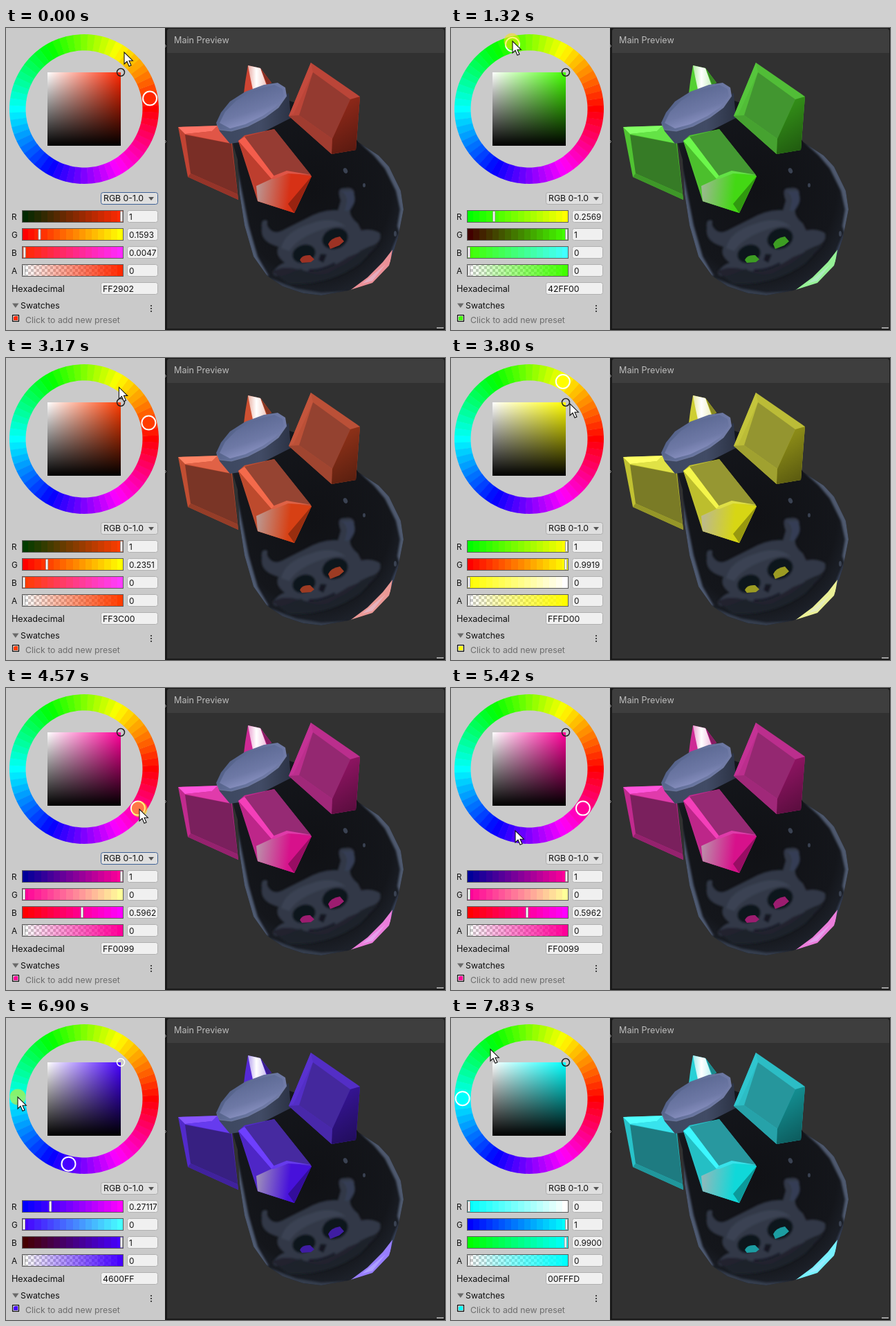
Recreate the animation shown at these times as an HTML page. Size 635x436 px, loop 8000 ms.

```html
<!DOCTYPE html>
<html lang="en">
<head>
<meta charset="utf-8">
<title>Colour picker and material preview</title>
<style>
html, body { margin: 0; width: 100%; height: 100%; overflow: hidden; background: #191919; }
svg { display: block; width: 635px; height: 436px; }
text { font: 12.3px Inter, "Open Sans", sans-serif; fill: #101010; }
.wide { font-size: 12.6px; }
#sliders text { font-size: 11.8px; }
</style>
</head>
<body>
<svg id="stage" viewBox="0 0 635 436">
  <defs>
    <linearGradient id="white"><stop stop-color="#fff"/><stop offset="1" stop-color="#fff" stop-opacity="0"/></linearGradient>
    <linearGradient id="black" x2="0" y2="1"><stop stop-opacity="0"/><stop offset="1"/></linearGradient>
    <linearGradient id="pale" x1="0" y1=".45" x2=".6" y2=".5"><stop stop-color="#b4b0b2" stop-opacity=".8"/><stop offset="1" stop-color="#b4b0b2" stop-opacity="0"/></linearGradient>
    <linearGradient id="shine"><stop stop-color="#fff" stop-opacity=".55"/><stop offset=".45" stop-color="#fff"/><stop offset="1" stop-color="#fff" stop-opacity=".7"/></linearGradient>
    <linearGradient id="dusk" x1=".4" y1="0" x2=".7" y2="1"><stop stop-opacity="0"/><stop offset="1" stop-opacity=".4"/></linearGradient>
    <linearGradient id="lip" x1="0" y1=".3" x2="1" y2=".7"><stop stop-color="#4c5a80"/><stop offset=".5" stop-color="#65729c"/><stop offset="1" stop-color="#7780ac"/></linearGradient>
    <linearGradient id="bowl" x1=".2" y1="0" x2=".7" y2="1"><stop stop-color="#53618a"/><stop offset=".6" stop-color="#6e79a6"/><stop offset="1" stop-color="#9aa0d2"/></linearGradient>
    <linearGradient id="neck"><stop stop-color="#3c475f"/><stop offset=".6" stop-color="#414b65"/><stop offset="1" stop-color="#2c3345"/></linearGradient>
    <radialGradient id="glass" cx=".48" cy=".45" r=".58"><stop stop-color="#101115"/><stop offset=".75" stop-color="#14161b"/><stop offset="1" stop-color="#20252f"/></radialGradient>
    <pattern id="check" width="8" height="8" patternUnits="userSpaceOnUse"><path d="M0 0h8v8H0z" fill="#fff"/><path d="M0 0h4v4H0zM4 4h4v4H4z" fill="#c6c6c6"/></pattern>
    <filter id="soft" x="-20%" y="-20%" width="140%" height="140%"><feGaussianBlur stdDeviation="1.8"/></filter>
    <clipPath id="bodyClip"><path d="M326 160L335 190 338 240 345 285 358 330 378 358 400 373 430 383 456 386 495 379 530 368 554 343 567 302 575 262 571 235 554 200 539 184 510 165 480 130 410 105Z"/></clipPath>
  </defs>

  <!-- preview -->
  <path d="M0 0H635V436H0z" fill="#191919"/>
  <path d="M233 434V5q0-4 4-4H630q4 0 4 4V434z" fill="#313131"/>
  <path d="M233 36V5q0-4 4-4H630q4 0 4 4V36z" fill="#3e3e3e"/>
  <text class="wide" x="243" y="22" style="fill:#bdbdbd">Main Preview</text>
  <path d="M623 433H633" stroke="#a0a0a0" stroke-width="2"/>

  <g id="model">
    <path data-s=".65 1" d="M350 54L368 58 384 79 362 90 344 94 346 78z"/>
    <path d="M350 54L368 58 377 83 357 89 353 70z" fill="url(#shine)"/>
    <path data-s=".42 .7" d="M369 60L384 79 378 83z"/>

    <g clip-path="url(#bodyClip)">
      <path d="M320 100H580V390H320z" fill="url(#glass)"/>
      <g filter="url(#soft)">
        <path d="M333 195L336 240 343 285 356 330 374 358 380 358 364 330 351 285 342 240z" fill="#5d6b88" opacity=".8"/>
        <path d="M510 164L541 183 556 200 573 235 577 262 570 298 566 286 570 262 564 235 548 203 532 184z" fill="#5d6983" opacity=".8"/>
        <path d="M378 360L400 375 430 385 456 388 495 380 456 382 420 376z" fill="#343d4e"/>
        <path d="M558 320L568 296 570 300 556 343z" fill="#39435a"/>
      </g>
      <path data-s=".45 3" d="M496 380L523 360 545 338 559 320 555 343 530 369z"/>
      <path data-s=".3 3.8" d="M515 369L536 352 549 341 530 365z"/>

      <g filter="url(#soft)" fill="#303746">
        <path d="M378 285Q386 301 404 290L432 276Q458 261 480 263L484 249Q477 230 489 231 505 228 504 241 507 252 499 258 494 270 509 282L514 292Q529 289 541 296 545 310 526 316L513 322Q501 337 482 345L466 354Q446 360 426 348L404 357Q386 361 386 352 394 341 403 339 388 328 394 316 367 309 370 289 368 274 378 278z"/>
        <path d="M398 318Q402 294 442 282 473 271 492 287 475 283 446 295 420 306 410 322z" fill="#3a4252"/>
        <path d="M482 236Q492 236 493 250L490 264 498 263Q509 250 501 235z" fill="#38415a" opacity=".7"/>
        <path d="M385 352Q401 342 425 349 455 358 494 331L539 312 512 340Q465 373 408 369z" fill="#1e232d" opacity=".9"/>
        <ellipse cx="431" cy="326" rx="17" ry="13" transform="rotate(-18 431 326)" fill="#11141b"/>
        <ellipse cx="476" cy="304" rx="19" ry="15" transform="rotate(-20 476 304)" fill="#11141b"/>
        <path d="M455 326l9 1-5 12-7-4z" fill="#141821"/>
        <path d="M438 350Q456 351 476 340" fill="none" stroke="#1a1f29" stroke-width="4"/>
      </g>
      <path data-s=".5 .7" d="M425 335Q428 327 440 328L446 334 441 338 428 339z"/>
      <path data-s=".5 .7" d="M466 312Q470 303 483 301L489 308 482 314 469 319z"/>
      <g fill="#3a4252"><ellipse cx="491" cy="206" rx="3" ry="4" transform="rotate(-25 491 206)"/><ellipse cx="518" cy="227" rx="2" ry="3"/><ellipse cx="563" cy="297" rx="2" ry="4"/></g>
    </g>

    <path data-s=".6 1" d="M249 143L315 141 327 167 336 248 263 215z"/>
    <path data-s=".78 2" d="M249 143L306 141 298 149 259 153z"/>
    <path data-s=".66 1.4" d="M259 153L298 149 306 141 315 141 327 167z"/>
    <path data-s=".36 .75" d="M259 154L326 167 335 240 267 210z"/>
    <path data-s=".46 .8" d="M267 210L335 240 336 248 263 215z"/>

    <path d="M304 137L309 149 324 167 345 164 412 130 409 94z" fill="url(#neck)"/>
    <path d="M304 137L311 122 324 106 346 92 373 82 393 79 404 86 406 98 394 115 375 129 350 142 326 149 309 147z" fill="url(#lip)"/>
    <path d="M309 137L317 121 333 105 358 90 388 82 400 88 402 98 390 114 371 127 346 139 324 145z" fill="url(#bowl)"/>
    <path d="M305 139L309 147 326 149 350 142 375 129 394 115 406 98" fill="none" stroke="#7d87aa" opacity=".6"/>

    <path data-s=".56 1.1" d="M441 50L512 99 506 176 471 182 409 127z"/>
    <path data-s=".58 1.2" d="M441 50L444 64 416 124 409 127z"/>
    <path data-s=".43 .95" d="M444 64L498 103 472 160 424 126z"/>
    <path data-s=".48 .95" d="M409 127L424 126 472 160 471 182z"/>
    <g>
      <path data-s=".5 .5" d="M498 103L512 99 506 176 471 182 472 160z"/>
      <path d="M498 103L512 99 506 176 471 182 472 160z" fill="url(#dusk)"/>
    </g>

    <path data-s=".6 1" d="M336 163L345 155 388 146 442 214 417 267 364 250z"/>
    <path data-s=".43 1" d="M345 157L388 146 441 212 406 207 388 214z"/>
    <path data-s=".72 1.5" d="M336 163L345 157 388 214 384 218z"/>
    <path data-s=".6 .9" d="M336 163L384 218 362 236z"/>
    <path data-s=".78 .4" d="M362 228L388 216 406 208 442 214 417 267 364 250z"/>
    <path d="M362 228L388 216 406 208 442 214 417 267 364 250z" fill="url(#pale)"/>
    <path data-s=".55 .3" d="M442 214L417 267 408 254z"/>
    <path data-s=".65 1.4" d="M384 218L388 213 406 206 441 212 408 210 388 218z"/>
  </g>

  <!-- picker -->
  <path d="M0 0H230V436H0z" fill="#cacaca"/>
  <path d="M230 24q3 2 0 4M230 162q3 2 0 4" stroke="#9a9a9a" fill="none"/>
  <g id="wheel"></g>
  <g shape-rendering="crispEdges">
    <path id="hue" d="M60 64h106v106H60z"/>
    <path d="M60 64h106v106H60z" fill="url(#white)"/>
    <path d="M60 64h106v106H60z" fill="url(#black)"/>
  </g>
  <circle id="pick" cx="166" cy="64" r="5.5" fill="none" stroke-width="1.5"/>
  <circle id="mark" r="10" stroke="#fff" stroke-width="2"/>

  <rect id="drop" x="137.5" y="237.5" width="82" height="17" rx="3" fill="#dfdfdf"/>
  <text x="141" y="250">RGB 0-1.0</text>
  <path d="M206 244h8l-4 5z" fill="#555"/>
  <g id="sliders"></g>
  <text class="wide" x="8" y="381">Hexadecimal</text>
  <rect x="137.5" y="367.5" width="82" height="17" rx="3" fill="#f0f0f0" stroke="#b0b0b0"/>
  <text id="hex" x="140" y="381"></text>
  <path d="M9 397.5h9.5l-4.7 6.5z" fill="#6a6a6a"/>
  <text x="21" y="405">Swatches</text>
  <path d="M209 400h2v2h-2zM209 404h2v2h-2zM209 408h2v2h-2z" fill="#444"/>
  <path d="M8 413h12v12H8z" fill="#f4f4f4"/>
  <path d="M9.5 414.5h9v9h-9z" fill="#fff" stroke="#111" stroke-width="1.5"/>
  <path id="chip" d="M11 417l2-1h4v6h-6z"/>
  <text x="28" y="426" style="fill:#6c6c6c">Click to add new preset</text>

  <circle id="press" r="11.5" fill="#ffe600" fill-opacity=".52"/>
  <path id="cursor" d="M0 0V17L4 13.300 7 20.300 10 19 7 12.200H12.300z" fill="#fff" stroke="#111" stroke-width="1.100"/>
</svg>
<script>
const LOOP = 8000, BANDS = 16;
const $ = id => document.getElementById(id);

function add(parent, tag, attrs, text) {
  const el = document.createElementNS("http://www.w3.org/2000/svg", tag);
  for (const k in attrs) el.setAttribute(k, attrs[k]);
  if (text) el.textContent = text;
  parent.appendChild(el);
  return el;
}

// time, hex, red, green, blue as shown in the fields
const picks = [
  [-70, "FF2902", "1", "0.1593", "0.0047"],
  [1160, "42FF00", "0.2569", "1", "0"],
  [2470, "FF3C00", "1", "0.2351", "0"],
  [3250, "FFFD00", "1", "0.9919", "0"],
  [4490, "FF0099", "1", "0", "0.5962"],
  [5500, "4600FF", "0.27117", "0", "1"],
  [6980, "00FFFD", "0", "1", "0.9900"]
];
// start, end, steps, target x, target y
const moves = [
  [310, 690, 6, 142, 15],
  [860, 1090, 4, 89, 19],
  [1620, 2100, 7, 217, 89],
  [2170, 2320, 3, 206, 95],
  [2790, 3180, 6, 160, 38],
  [3800, 3800, 1, 172, 66],
  [3880, 4340, 7, 193, 175],
  [4810, 5420, 9, 93, 206],
  [5810, 6420, 9, 3, 111],
  [6590, 6750, 3, 17, 114],
  [7210, 7830, 9, 57, 45]
];
// on, off, x, y
const presses = [
  [1090, 1400, 88, 19],
  [2470, 2620, 206, 94],
  [3250, 3570, 160, 38],
  [4410, 4640, 193, 175],
  [5500, 5810, 93, 207],
  [6900, 7060, 17, 114]
];

const rgb = c => `rgb(${c.map(v => Math.round(Math.min(255, v)))})`;
const parse = hex => [0, 2, 4].map(i => parseInt(hex.slice(i, i + 2), 16));

function hueOf([r, g, b]) {
  const max = Math.max(r, g, b), d = max - Math.min(r, g, b);
  const h = max === r ? (g - b) / d : max === g ? 2 + (b - r) / d : 4 + (r - g) / d;
  return (h * 60 + 360) % 360;
}
function onRing(deg, r) {
  const a = deg * Math.PI / 180;
  return [113 + r * Math.cos(a), 117 - r * Math.sin(a)];
}

const SEGS = 64, OUTER = 108, INNER = 84.5, step = 360 / SEGS;
for (let i = 0; i < SEGS; i++) {
  const a = (i - .5) * step, b = a + step + .25;
  add($("wheel"), "path", {
    d: `M${onRing(a, OUTER)}A${OUTER} ${OUTER} 0 0 0 ${onRing(b, OUTER)}L${onRing(b, INNER)}A${INNER} ${INNER} 0 0 1 ${onRing(a, INNER)}z`,
    fill: `hsl(${i * step} 100% 50%)`
  });
}

const sliders = ["R", "G", "B", "A"].map((name, i) => {
  const g = $("sliders"), y = 263 + i * 26;
  add(g, "text", { x: 8, y: y + 14 }, name);
  add(g, "rect", { x: 23, y, width: 147, height: 18, fill: "url(#check)" });
  const bands = Array.from({ length: BANDS }, (_, n) => add(g, "rect", {
    x: 23 + n * 147 / BANDS, y, width: 147 / BANDS, height: 18, "shape-rendering": "crispEdges"
  }));
  add(g, "rect", { x: 23.5, y: y + .5, width: 146, height: 17, fill: "none", stroke: "#5c5c5c" });
  const thumb = add(g, "rect", { y: y + 1.5, width: 3, height: 15, rx: 1, fill: "#fff", stroke: "#999" });
  add(g, "rect", { x: 175.5, y: y + .5, width: 44, height: 17, rx: 3, fill: "#f0f0f0", stroke: "#b0b0b0" });
  const clip = add(g, "clipPath", { id: "field" + i });
  add(clip, "rect", { x: 176, y, width: 42, height: 18 });
  const label = add(g, "text", { x: 178, y: y + 14, "clip-path": `url(#field${i})` });
  return { bands, thumb, label };
});

function paintPanel([, hex, ...vals]) {
  const c = parse(hex), h = hueOf(c), [x, y] = onRing(h, 96.3);
  const pure = `hsl(${h} 100% 50%)`;
  $("hue").style.fill = $("mark").style.fill = pure;
  $("chip").style.fill = rgb(c);
  $("mark").setAttribute("cx", x);
  $("mark").setAttribute("cy", y);
  $("pick").setAttribute("stroke", h > 230 && h < 290 ? "#fff" : "#222");
  $("hex").textContent = hex;
  sliders.forEach((s, i) => {
    const v = vals[i] || "0";
    s.bands.forEach((band, n) => {
      const f = n / (BANDS - 1);
      band.style.fill = rgb(c.map((u, k) => k === i ? f * 255 : u));
      band.style.opacity = i === 3 ? f : 1;
    });
    s.thumb.setAttribute("x", 24.5 + v * 141);
    s.label.textContent = v;
  });
}

// each facet: share of the picked colour, share of ambient light
const facets = [...document.querySelectorAll("[data-s]")].map(el => [el, ...el.dataset.s.split(" ").map(Number)]);
const ambient = [40, 42, 50];
function paintModel([, hex]) {
  const c = parse(hex);
  for (const [el, k, a] of facets) el.style.fill = rgb(c.map((v, i) => v * k + ambient[i] * a));
}

function cursorAt(t) {
  let x = 171, y = 35;
  for (const [t0, t1, n, tx, ty] of moves) {
    if (t < t0) break;
    const k = t >= t1 ? n : 1 + Math.floor((t - t0) / (t1 - t0) * (n - 1));
    const p = k / n, e = p * p * (3 - 2 * p);
    x += (tx - x) * e;
    y += (ty - y) * e;
  }
  return [x, y];
}

let panel, model;
function draw(now) {
  const t = now % LOOP;
  const pick = picks.findLast(p => t >= p[0]);
  const skin = picks.findLast(p => t >= p[0] + 70);
  if (pick !== panel) paintPanel(panel = pick);
  if (skin !== model) paintModel(model = skin);
  $("drop").setAttribute("stroke", t < pick[0] + 150 ? "#3d6094" : "#adadad");

  const hit = presses.find(p => t >= p[0] && t < p[1]);
  $("press").setAttribute("visibility", hit ? "visible" : "hidden");
  if (hit) $("press").setAttribute("transform", `translate(${hit[2]} ${hit[3]})`);
  $("cursor").setAttribute("transform", `translate(${cursorAt(t)})`);
}

const start = performance.now();
function tick() {
  draw(performance.now() - start);
  requestAnimationFrame(tick);
}
tick();
</script>
</body>
</html>
```
